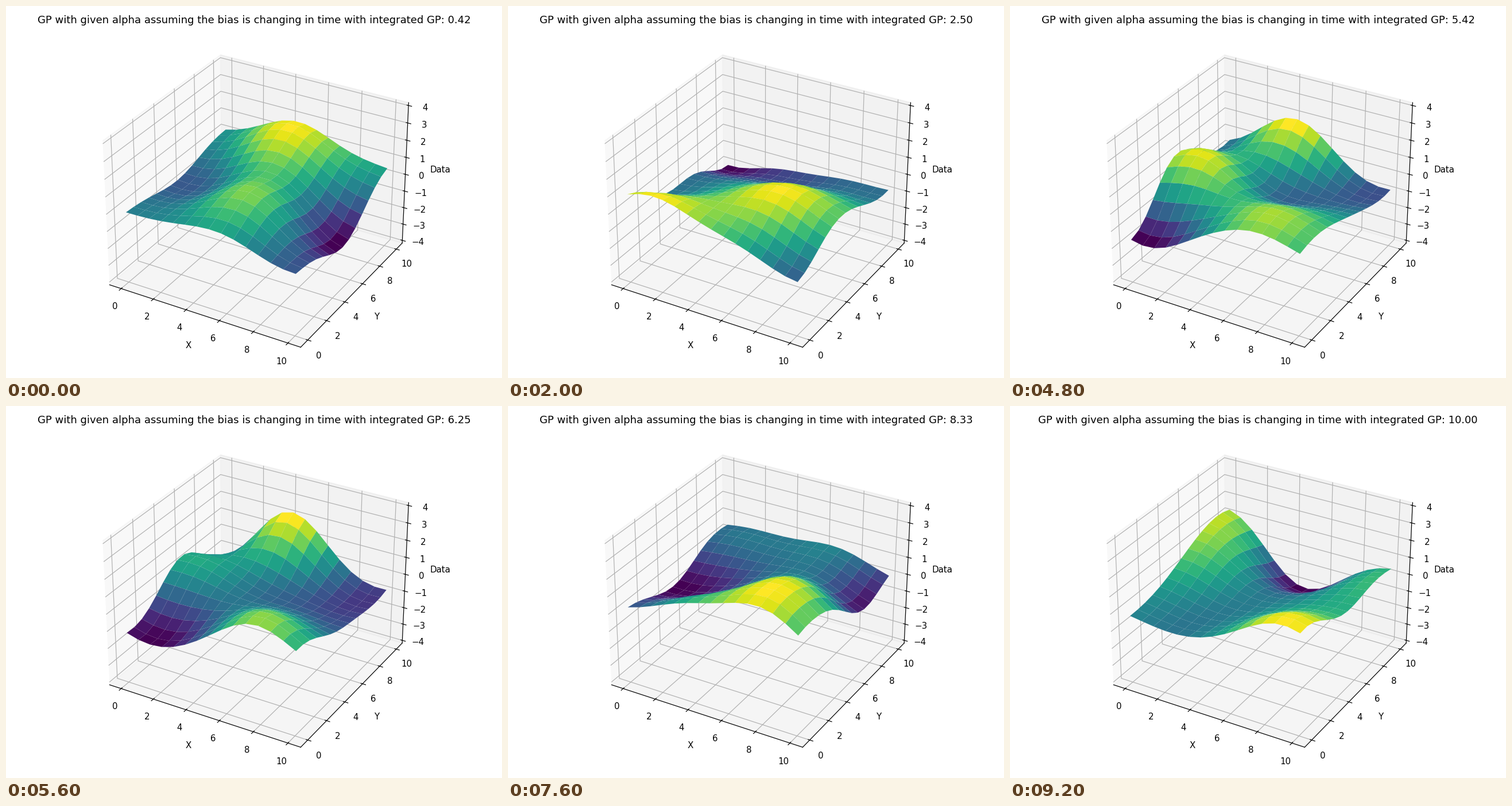
Recreate the animation shown at these times as a matplotlib script. Size 864x648 px, loop 9600 ms.

```python
import numpy as np
import matplotlib.pyplot as plt
from matplotlib.animation import FuncAnimation

W, H, DPI = 864, 648, 108
STEPS, INTERVAL = 24, 400
PAD = 1.08 * 10 * DPI / 72
BASELINE = 30.2
TITLE_GAP = 6 * DPI / 72
SPACE_LENGTH, TIME_LENGTH = 2.2, 2.5
TITLE = ("GP with given alpha assuming the bias is changing in time "
         "with integrated GP: {:.2f}")

# Hills and dips (x, y, height) the surface passes through at each key step.
key_steps = np.array([0, 5, 9, 12, 16, 19, 23])
key_points = [
    [(4.5, 9, 2.0), (6, 3, 1.3), (10, 5, -1.7), (1.5, 5, -0.5),
     (9, 0, -0.5), (10, 10, 0.5)],
    [(1.2, 0.3, 1.25), (0, 3, -0.5), (7, 4, 1.3), (10, 0, -1.05),
     (0, 10, -2.0), (5, 9, -1.2), (10, 9.5, -0.8)],
    [(1, 4.3, 2.0), (10, 0, 2.3), (10, 4, 2.6), (3.5, 10, -2.0),
     (0, 10, 0.9), (0, 0, -0.4), (5, 0, 1.3), (7, 5.5, -0.4), (9, 10, -0.8)],
    [(1, 0.3, -1.7), (1.8, 4.5, 1.6), (7.5, 1.6, 1.3), (4.2, 10, 1.9),
     (0, 9, -0.5), (9, 9.5, -0.8), (4.5, 6.5, -0.3)],
    [(8, 0.3, 2.6), (1.5, 3.2, -1.0), (4, 10, 1.4), (0, 10, -1.3),
     (0, 6.3, 0.5), (9.5, 8, -0.9)],
    [(8, 0, 2.5), (8, 4, 2.1), (1, 4.5, -0.6), (10, 6.5, -0.4),
     (1.5, 8.3, 0.7), (7, 10, 0.9), (3.5, 0.3, 1.5)],
    [(0, 9.5, 1.5), (1, 6, 0.95), (4.6, 10, -2.1), (9, 0.5, 1.9),
     (2.5, 0, -0.5), (3.8, 4, -0.4), (10, 8.5, 0.65)],
]


def kernel(a, b, length):
    gap = a[:, None, :] - b[None, :, :]
    return np.exp(-0.5 * (gap ** 2).sum(axis=2) / length ** 2)


def gp_mean(at, knots, values, length):
    """Mean of a noise-free GP that passes through the values at the knots."""
    coeffs = np.linalg.solve(kernel(knots, knots, length), values)
    return kernel(at, knots, length) @ coeffs


grid = np.linspace(0, 10, 15)
X, Y = np.meshgrid(grid, grid)
nodes = np.column_stack([X.ravel(), Y.ravel()])


def pose(points):
    points = np.array(points)
    return gp_mean(nodes, points[:, :2], points[:, 2], SPACE_LENGTH)


heights = gp_mean(np.arange(STEPS)[:, None], key_steps[:, None],
                  np.array([pose(p) for p in key_points]), TIME_LENGTH)
heights = heights.reshape(STEPS, *X.shape)

fig = plt.figure(figsize=(W / DPI, H / DPI), dpi=DPI)
top = BASELINE + TITLE_GAP
ax = fig.add_axes([PAD / W, PAD / H, 1 - 2 * PAD / W, (H - PAD - top) / H],
                  projection="3d")
title = fig.text(0.5, 1 - BASELINE / H, "", fontsize=12,
                 ha="center", va="baseline")


def padded(low, high):
    edge = (high - low) / 48
    return low - edge, high + edge


ax.set_xlim(*padded(-0.5, 10.5))
ax.set_ylim(*padded(-0.5, 10.5))
ax.set_zlim(*padded(-4, 4))
ax.set_xticks(range(0, 11, 2))
ax.set_yticks(range(0, 11, 2))
ax.set_zticks(range(-4, 5))
ax.set_xlabel("X")
ax.set_ylabel("Y")
ax.set_zlabel("Data")
ax.view_init(elev=30, azim=-60)


def draw(step):
    for surface in list(ax.collections):
        surface.remove()
    ax.plot_surface(X, Y, heights[step], cmap="viridis")
    title.set_text(TITLE.format(10 * (step + 1) / STEPS))
    return []


anim = FuncAnimation(fig, draw, frames=STEPS, init_func=lambda: draw(0),
                     interval=INTERVAL, repeat=True, repeat_delay=0,
                     blit=False)
plt.show()
```
